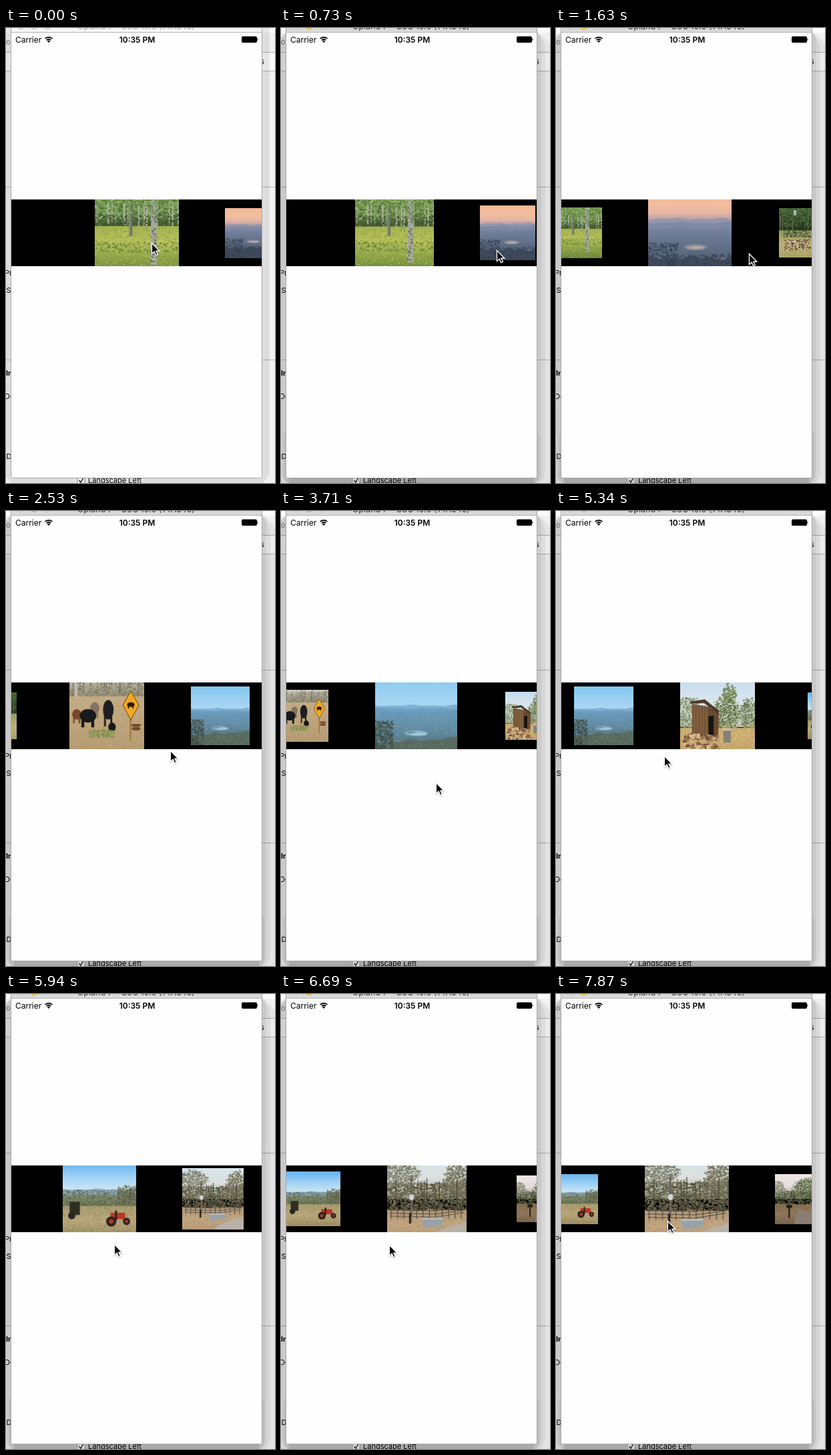
An HTML page with a canvas for the animation above (8000 ms loop, 403x682 px).

```html
<!DOCTYPE html>
<html lang="en">
<head>
<meta charset="utf-8">
<title>Photo carousel</title>
<style>
html, body { margin: 0; width: 100%; height: 100%; overflow: hidden; background: #ececec; }
svg, canvas { position: absolute; left: 0; top: 0; }
text { font: 11px Inter, "Open Sans", sans-serif; fill: #000; }
.b { font-weight: 700; }
.bar { font-size: 12px; }
.time { font-weight: 600; }
#name { font-size: 12.5px; }
</style>
</head>
<body>
<svg width="403" height="682" viewBox="0 0 403 682">
  <rect width="403" height="682" fill="#f1f1f1"/>
  <rect y="37" width="403" height="28" fill="#fafafa"/>
  <rect width="403" height="7" fill="#fbfbfb"/>
  <path d="M0 36.5H403M0 64.5H403M0 238.5H403M0 497.5H403" stroke="#b4b4b4"/>
  <text x="0" y="25" fill-opacity=".5">o</text>
  <text x="381" y="54">s</text>
  <text x="-2" y="371">Pr</text>
  <text x="0.5" y="397">S</text>
  <text x="0" y="521" class="b">In</text>
  <text x="-2" y="556">De</text>
  <text x="0.5" y="646">D</text>
  <g id="idle"><rect x="-2" y="-30" width="397" height="716" rx="24" fill-opacity=".08"/></g>
  <g id="active" fill-opacity=".06">
    <rect x="-14" y="2" width="422" height="704" rx="44"/>
    <rect x="-6" y="2" width="402" height="692" rx="32"/>
    <rect x="1" y="2" width="389" height="682" rx="16"/>
    <rect x="4" y="600" width="383" height="84" rx="14"/>
    <rect x="12" y="600" width="367" height="90" rx="8" fill-opacity=".1"/>
  </g>
  <rect x="107" y="672.5" width="11" height="11" fill="#fff" fill-opacity=".5" stroke="#888"/>
  <path d="M109.5 678l2.500 3 4-7" fill="none" stroke="#222" stroke-width="1.5"/>
  <text x="123" y="682">Landscape Left</text>
  <rect x="7.5" y="-20" width="376" height="694.5" rx="2" fill="#fefefe" stroke="#a8a8a8"/>
  <rect id="title" x="8" width="375" height="6"/>
  <path d="M8 6.5H383" stroke="#b5b5b5"/>
  <g stroke="#bbb" stroke-width=".6" fill="#d6d6d6">
    <circle cx="22" cy="-4" r="6"/><circle id="amber" cx="42" cy="-4" r="6"/><circle cx="62" cy="-4" r="6"/>
  </g>
  <text id="name" x="195" y="1.5" text-anchor="middle">Upland 7 – uOS 10.0 (14A345)</text>
  <text x="14" y="22" class="bar">Carrier</text>
  <text x="196.5" y="22" class="bar time" text-anchor="middle">10:35 PM</text>
  <path d="M58.5 16a8 8 0 0 1 11 0M60.700 18.200a5 5 0 0 1 6.600 0" fill="none" stroke="#000" stroke-width="1.7"/>
  <path d="M64 22l-2.200-2.300a3 3 0 0 1 4.400 0z"/>
  <rect x="353" y="12.5" width="23" height="9.5" rx="2"/>
  <path d="M376.500 15q2 2.200 0 4.500z"/>
</svg>
<canvas id="stage" width="403" height="682"></canvas>
<script>
const $ = id => document.getElementById(id);
const ctx = $('stage').getContext('2d');

// Painting helpers; every photo is a 100 x 100 square.
let p, seed;
const rnd = (a = 0, b = 1) => {
  seed = (seed * 16807) % 2147483647;
  return a + (b - a) * seed / 2147483647;
};
const fade = (y0, y1, ...colors) => {
  const g = p.createLinearGradient(0, y0, 0, y1);
  colors.forEach((c, i) => g.addColorStop(i / (colors.length - 1), c));
  p.fillStyle = g;
  p.fillRect(0, y0, 100, y1 - y0);
};
const box = (color, x, y, w, h) => { p.fillStyle = color; p.fillRect(x, y, w, h); };
const blob = (color, x, y, rx, ry = rx) => {
  p.fillStyle = color;
  p.beginPath();
  p.ellipse(x, y, rx, ry, 0, 0, 7);
  p.fill();
};
const poly = (color, ...pts) => {
  p.fillStyle = color;
  p.beginPath();
  for (let i = 0; i < pts.length; i += 2) p.lineTo(pts[i], pts[i + 1]);
  p.fill();
};
const specks = (n, x, y, w, h, size, ...colors) => {
  for (let i = 0; i < n; i++)
    blob(colors[i % colors.length], rnd(x, x + w), rnd(y, y + h), rnd(.4, 1) * size, rnd(.3, .8) * size);
};
// Round leafy crown, built from specks that thin out toward the rim.
const crown = (x, y, rx, ry, ...colors) => {
  for (let i = 0; i < rx * ry * 1.6; i++) {
    const a = rnd(0, 6.3), r = Math.sqrt(rnd()) * rnd(.75, 1.1);
    blob(colors[i % colors.length], x + rx * r * Math.cos(a), y + ry * r * Math.sin(a), rnd(.5, 1.3), rnd(.4, 1));
  }
};
const trunks = (n, y0, y1, w, color) => {
  for (let i = 0; i < n; i++) box(color, rnd(0, 100), y0 + rnd(-4, 4), rnd(.5, 1) * w, y1 - y0);
};
const ridge = (color, y, amp, slope = 0) => {
  const pts = [];
  for (let x = 0; x <= 100; x += 4)
    pts.push(x, y + slope * x + amp * (Math.sin(x / 9 + y) + Math.sin(x / 4 + y)) / 2);
  poly(color, ...pts, 100, 100, 0, 100);
};
const cow = (color, x, y, w, h) => {
  blob(color, x, y, w, h);
  box(color, x - w * .8, y, w * .35, h * 1.7);
  box(color, x + w * .4, y, w * .35, h * 1.7);
};

const scenes = [
  () => { // birch grove
    fade(0, 45, '#7da055', '#68884a', '#3c502e');
    specks(1300, 0, 0, 100, 34, 1.2, '#8db460', '#55783d', '#b3cb8c', '#456630');
    trunks(26, 16, 42, 1.3, '#b4bba6');
    specks(250, 0, 28, 100, 14, 1.2, '#3a4d2c', '#64804a', '#2f4026');
    fade(42, 100, '#a3b250', '#b8c15a', '#8da146', '#64803a');
    specks(900, 0, 43, 100, 57, 1, '#c6cb6a', '#8da446', '#aebb56', '#799240');
    specks(180, 0, 61, 100, 12, 1.4, '#66803a', '#789245');
    box('#85907a', 41, 12, 4, 42);
    box('#66705b', 43, 12, 2, 42);
    box('#a2a794', 67, 0, 7.5, 88);
    specks(130, 66, 0, 8, 87, 1.2, '#6d7362', '#c0c4b4', '#4f5847');
    specks(250, 25, 5, 75, 22, 1.2, '#7ca250', '#9bbb6c', '#587a3e');
  },
  () => { // dusk valley
    fade(0, 33, '#f5b994', '#f2be a0'.replace(' ', ''), '#dcb0a6');
    fade(28, 40, '#d8aea6', '#a39bab');
    ridge('#9496aa', 33, 1.2);
    ridge('#8089a3', 38, 1.2);
    ridge('#74819c', 45, 1.2);
    fade(48, 80, '#72809b', '#56647a');
    blob('#83889a', 57, 67, 14, 3.5);
    blob('#a59c9f', 57, 68, 11, 2.4);
    blob('#c0aaa5', 59, 67, 7, 1.1);
    ridge('#3e4a5a', 80, 3);
    specks(420, 0, 62, 36, 38, 1.3, '#3b4757', '#4a586b', '#303b49');
    specks(420, 20, 76, 80, 24, 1.3, '#3f4a59', '#303a47', '#465266');
  },
  () => { // shady clearing
    fade(0, 46, '#526f3c', '#2e4527', '#253520');
    specks(900, 0, 0, 100, 38, 1.5, '#415d30', '#2c4225', '#66804f');
    box('#a6b3ae', 30, 4, 6, 10);
    trunks(9, 15, 50, 1.6, '#6d6b55');
    fade(45, 100, '#8f9a59', '#bfb078', '#a9a365');
    specks(500, 0, 45, 100, 55, 1, '#c9bf8d', '#98a060');
    specks(220, 12, 64, 52, 22, 2, '#3b3a2d', '#a98e6c', '#6b4b36', '#ded0b5');
    specks(200, 10, 44, 55, 16, 1.6, '#566541', '#35442b');
  },
  () => { // cattle and sign
    fade(0, 26, '#cfcdc5', '#aaa692', '#8f866c');
    specks(700, 0, 3, 100, 22, 1.1, '#85826c', '#b5ae98', '#6d6a54');
    trunks(14, 2, 22, 1, '#71695a');
    box('#bdbab0', 7, 3, 4, 22);
    fade(24, 100, '#c4ac86', '#bea37a', '#b39a70');
    specks(900, 0, 25, 100, 75, .9, '#d1b98f', '#ab946e', '#c9b086');
    cow('#79492f', 10, 48, 6, 7);
    cow('#857463', 34, 40, 6, 8);
    cow('#191a1d', 25, 50, 11, 9);
    cow('#1d1e21', 52, 42, 7, 13);
    blob('#16171a', 57, 65, 5, 6);
    specks(300, 27, 69, 34, 10, 1.3, '#8c9a55', '#6e7d45', '#a5a76a');
    box('#a27a3e', 80.5, 50, 2, 33);
    poly('#4a3818', 82, 16, 93, 36, 82, 56, 71, 36);
    poly('#f5a91f', 82, 17.5, 92.200, 36, 82, 54.500, 71.800, 36);
    cow('#241b10', 82, 35, 5, 3);
    box('#6d3f25', 83, 61, 12, 3);
    blob('#76482b', 89, 67, 6, 2.5);
  },
  () => { // blue lake view
    fade(0, 40, '#83c6ef', '#9bd0f2', '#abd8f2');
    ridge('#7fb0d4', 37.5, 1);
    ridge('#6ea0c5', 41, 1);
    fade(44, 80, '#6b9dbf', '#6590a8', '#5a7c88');
    specks(300, 0, 45, 100, 30, 1.3, '#7299b1', '#628ca4');
    blob('#86acc4', 50, 71, 14, 3.5);
    blob('#a3c4da', 53, 72, 10, 2);
    blob('#6a8da0', 44, 70, 5, 1);
    ridge('#586c62', 82, 2, -.05);
    specks(600, 0, 56, 22, 44, 1.2, '#43514b', '#566862', '#35413c');
    specks(500, 14, 82, 86, 18, 1.2, '#5d6f60', '#4a5950', '#70796a');
  },
  () => { // wooden shed
    fade(0, 65, '#c4dcf0', '#dbe7ed', '#c0c8b6');
    specks(500, 0, 26, 24, 42, 1.3, '#8f9b75', '#6d7f50', '#a7ae8c');
    crown(62, 46, 19, 24, '#5f7440', '#7b8a55', '#475c31', '#949a6c');
    crown(66, 20, 10, 13, '#73854d', '#566b3c', '#8b9766');
    crown(92, 48, 12, 22, '#6a7a4e', '#98a07c', '#56663f');
    fade(66, 100, '#c9ae76', '#cfae70', '#b99a67');
    specks(600, 55, 63, 45, 37, 1, '#dec68c', '#b8965c', '#cdb078');
    poly('#80603f', 16, 34, 40, 38, 40, 80, 16, 76);
    poly('#68492f', 38, 38, 52, 46, 51, 79, 38, 81);
    for (let x = 17; x < 40; x += 4) box('#5e432e', x, 36, .7, 41);
    poly('#4b3a2c', 13, 31, 33, 28, 53, 44, 51, 47, 32, 33, 14, 34);
    box('#171410', 38, 50, 7, 29);
    specks(150, 5, 75, 47, 23, 3.4, '#c3a27a', '#987350', '#d7bc94', '#735238');
    box('#858176', 58, 69, 10, 17);
    box('#c4c1b7', 57, 68, 12, 2);
  },
  () => { // tractor field
    fade(0, 40, '#65b3ef', '#9fd2f5', '#d2e8f2');
    ridge('#85a9c7', 37, 1);
    fade(44, 60, '#819078', '#68704f');
    specks(700, 0, 38, 100, 21, 1.3, '#6f7a5c', '#8b8b70', '#555f45');
    specks(300, 75, 32, 25, 25, 1.4, '#76795d', '#565d42');
    fade(60, 100, '#a69b6d', '#b9a77b', '#9b8b61');
    specks(800, 0, 60, 100, 40, 1, '#c4b58a', '#8f8158', '#ac9c72');
    box('#302e24', 9, 54, 14, 18);
    blob('#272a22', 12, 73, 5);
    box('#bf3524', 65, 69, 20, 9);
    box('#33251f', 71, 66, 3, 14);
    blob('#292524', 66, 81, 7);
    blob('#292524', 87, 81, 5);
    blob('#b33a2b', 66, 81, 3);
    blob('#b33a2b', 87, 81, 2);
  },
  () => { // corral
    fade(0, 50, '#d9e6ee', '#dcdfdd', '#8f8d7a');
    specks(1300, 0, 30, 100, 34, 1.6, '#5c5e4a', '#77755e', '#474c38', '#80704f');
    crown(18, 18, 24, 16, '#80826f', '#9b9b88', '#656955');
    crown(88, 26, 17, 22, '#656850', '#83745a', '#737860');
    trunks(14, 26, 63, 1.2, '#50483b');
    fade(64, 100, '#ad9879', '#c3a580', '#b79a78');
    specks(500, 0, 62, 100, 38, 1, '#c8ac88', '#a08a68');
    p.strokeStyle = '#54483d';
    p.lineWidth = .8;
    p.beginPath();
    for (let i = 0; i < 4; i++) {
      p.moveTo(4, 60 + i * 4);
      p.lineTo(60, 61 + i * 4);
      p.lineTo(97, 58 + i * 3);
    }
    p.stroke();
    for (let x = 5; x < 98; x += 8) box('#54483d', x, 58, 1, 17);
    box('#706b63', 30, 20, 2, 53);
    blob('#d0d8db', 31, 48, 3, 3.5);
    box('#1f1b17', 28, 68, 2.5, 13);
    poly('#b9b1a7', 64, 90, 100, 79, 100, 100, 50, 100);
    poly('#9aa2a5', 44, 75, 70, 73, 70, 84, 45, 87);
    box('#bbc1c2', 44, 74, 26, 2);
  },
  () => { // country road
    fade(0, 50, '#eee5e7', '#e4dedc', '#85876f');
    specks(800, 0, 35, 100, 27, 1.7, '#4f583c', '#6d7054', '#394329');
    crown(70, 28, 34, 21, '#526338', '#3c4d2a', '#788355');
    crown(6, 28, 14, 14, '#7a7d66', '#9a9a86');
    trunks(6, 30, 60, 1.5, '#443d30');
    fade(61, 100, '#806d4c', '#91775b', '#77624b');
    specks(500, 0, 59, 100, 41, 1, '#a18869', '#6f5f43');
    poly('#8b7d72', 45, 70, 100, 83, 100, 100, 38, 100);
    box('#29241f', 27, 63, 3, 25);
    box('#1f1f20', 23, 62, 11, 6);
  }
];

const photos = scenes.map((paint, i) => {
  const c = document.createElement('canvas');
  c.width = c.height = 126;
  p = c.getContext('2d');
  p.scale(1.26, 1.26);
  seed = 7919 * (i + 1);
  paint();
  return c;
});

// Scroll offset over time: [ms, px]
const scroll = [[0, 0], [590, 0], [880, 65], [1180, 135], [1630, 165], [1780, 170], [1930, 170],
  [2220, 300], [2520, 555], [2960, 635], [3705, 673], [4150, 680], [4740, 680], [5040, 740],
  [5190, 740], [5335, 804.5], [5780, 1035], [6220, 1130], [6670, 1167.5], [7430, 1190], [8000, 1190]];
// Pointer tip: [ms, x, y]
const pointer = [[0, 218, 322], [140, 218, 322], [590, 335, 330], [1030, 289, 338], [1630, 289, 338],
  [1780, 325, 347], [1930, 325, 347], [2220, 262, 352], [2520, 246, 359], [3120, 232, 403],
  [3705, 232, 407], [4150, 286, 338], [4740, 286, 338], [5040, 226, 340], [5190, 226, 340],
  [5335, 162, 367], [6220, 162, 376], [7430, 162, 376], [7850, 167, 340], [8000, 167, 340]];

// Monotone cubic through the keys.
function track(keys, t, col = 1) {
  const slope = i => keys[i + 1] && keys[i] ? (keys[i + 1][col] - keys[i][col]) / (keys[i + 1][0] - keys[i][0]) : 0;
  const tangent = i => {
    const a = slope(i - 1), b = slope(i);
    return a * b > 0 ? 2 * a * b / (a + b) : 0;
  };
  let i = 0;
  while (i < keys.length - 2 && keys[i + 1][0] <= t) i++;
  const [a, b] = [keys[i], keys[i + 1]], d = b[0] - a[0], u = (t - a[0]) / d, v = 1 - u;
  return a[col] * v * v * (1 + 2 * u) + b[col] * u * u * (1 + 2 * v)
    + d * u * v * (tangent(i) * v - tangent(i + 1) * u);
}

function drawStrip(offset) {
  ctx.save();
  ctx.beginPath();
  ctx.rect(8, 257, 375, 100);
  ctx.clip();
  ctx.fillStyle = '#000';
  ctx.fillRect(8, 257, 375, 100);
  photos.forEach((photo, i) => {
    const x = i * 170 - offset;
    const size = Math.max(70, 126 - .3 * Math.abs(x));
    ctx.drawImage(photo, 195.5 + x - size / 2, 307 - size / 2, size, size);
  });
  ctx.restore();
}

const arrow = new Path2D('M0 0V16L3.7 12.6 6.2 18.2 8.7 17 6.3 11.6H11.2Z');
function drawPointer(x, y) {
  ctx.save();
  ctx.translate(Math.round(x) + .5, Math.round(y) + .5);
  ctx.fillStyle = '#000';
  ctx.strokeStyle = '#fff';
  ctx.lineWidth = 1.2;
  ctx.shadowColor = '#0006';
  ctx.shadowBlur = 2;
  ctx.shadowOffsetY = 1;
  ctx.stroke(arrow);
  ctx.shadowColor = 'transparent';
  ctx.fill(arrow);
  ctx.stroke(arrow);
  ctx.restore();
}

function setFocus(on) {
  $('idle').style.display = on ? 'none' : '';
  $('active').style.display = on ? '' : 'none';
  $('title').style.fill = on ? '#d9d9d9' : '#f6f6f6';
  $('amber').style.fill = on ? '#f6b52f' : '#d6d6d6';
  $('name').style.fill = on ? '#333' : '#aaa';
}

const LOOP = 8000, STEPS = 54, STEP = LOOP / STEPS;
function frame(now) {
  const step = Math.floor((now % LOOP + 10) / STEP) % STEPS;
  const t = step * STEP;
  setFocus(step > 0);
  ctx.clearRect(0, 0, 403, 682);
  drawStrip(track(scroll, t));
  drawPointer(track(pointer, t), track(pointer, t, 2));
  requestAnimationFrame(frame);
}
frame(0);
</script>
</body>
</html>
```
